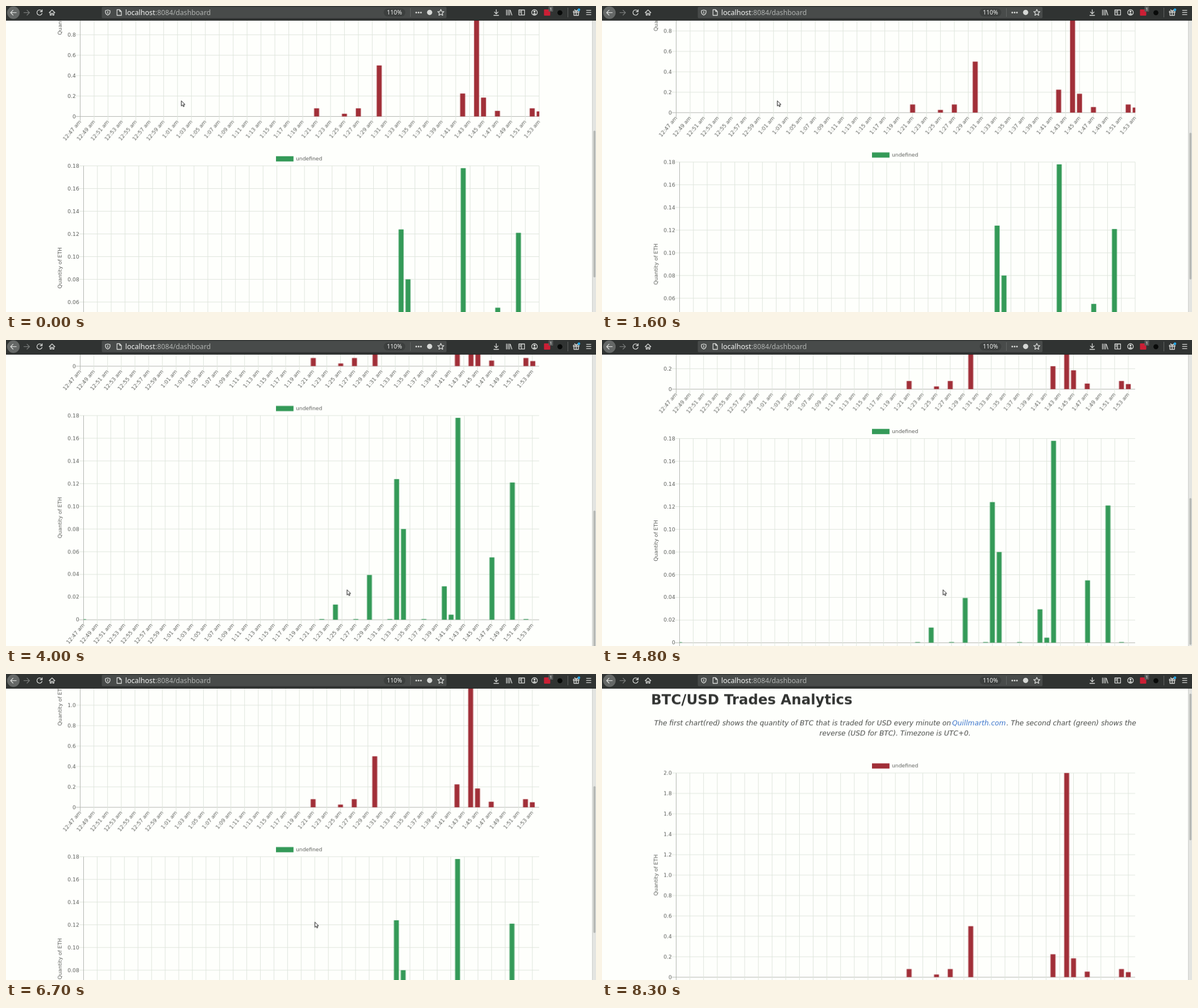
An HTML page for the animation above (8.7 s loop, 1038 by 539 pixels).

```html
<!DOCTYPE html>
<html lang="en">
<head>
<meta charset="utf-8">
<title>Dashboard</title>
<style>
  html, body { margin: 0; width: 100%; height: 100%; overflow: hidden; background: #fefffc; }
  #stage { display: block; width: 1038px; height: 539px; }
  text { font-family: "DejaVu Sans", sans-serif; }
  .axis { font-size: 9.2px; fill: #5c5e5b; }
  .heading { font-size: 24.46px; font-weight: bold; fill: #323432; }
  .intro { font-size: 12.23px; font-style: italic; fill: #484a48; }
  .url { font-family: "Noto Sans", "Open Sans", sans-serif; }
  .grid { stroke: #dfe5dd; fill: none; }
  .base { stroke: #b3b6b1; fill: none; }
  .icon { stroke: #d6d8d6; stroke-width: 1.3; fill: none; stroke-linecap: round; stroke-linejoin: round; }
</style>
</head>
<body>
<svg id="stage" viewBox="0 0 1038 539">
  <g id="page">
    <text class="heading" x="86.2" y="53.5">BTC/USD Trades Analytics</text>
    <text class="intro" x="91.7" y="90.5">The first chart(red) shows the quantity of BTC that is traded for USD every minute on</text>
    <text class="intro" x="616" y="90.5" style="fill:#3973cc">Quillmarth.com</text>
    <text class="intro" x="711.5" y="90.5">. The second chart (green) shows the</text>
    <text class="intro" x="515.5" y="108.8" text-anchor="middle">reverse (USD for BTC). Timezone is UTC+0.</text>
  </g>

  <rect x="1031.5" y="25" width="7" height="514" fill="#e3e4e1"/>
  <path d="M1031.5 25V539" stroke="#cfd0cd"/>
  <rect id="thumb" x="1033.5" y="34.5" width="3.6" height="258.5" rx="1.8" fill="#b5b7b4"/>

  <g id="toolbar">
    <rect width="1038" height="25.5" fill="#303332"/>
    <path d="M0 25H1038" stroke="#1f2221"/>
    <circle cx="13" cy="11.7" r="11" fill="#656867"/>
    <path class="icon" d="M18 11.7H8.3M12.4 7.4L8.1 11.7L12.4 16"/>
    <path class="icon" style="stroke:#777a79" d="M31.5 11.7H41M37 7.4L41.3 11.7L37 16"/>
    <path class="icon" d="M62.6 8.6A4.6 4.6 0 1 0 63.4 13M63.6 6.6V10H60.2"/>
    <path class="icon" d="M76 11.8L81 7L86 11.8M77.7 11V16H79.8V12.8H82.2V16H84.3V11"/>

    <rect x="168.5" y="1.5" width="606.5" height="20" rx="2" fill="#484b4a"/>
    <path class="icon" d="M179 7L183 8.2V11.3Q182.6 14.4 179 16Q175.4 14.4 175 11.3V8.2ZM179 9.4V13.2"/>
    <path class="icon" d="M195.3 6.5H200L203 9.6V16.5H195.3ZM200 6.5V9.6H203"/>
    <text class="url" x="209.7" y="16" font-size="12.5" fill="#f4f5f4">localhost</text>
    <text class="url" x="262.8" y="16" font-size="12.2" fill="#b0b3b1">:8084/dashboard</text>
    <rect x="664.5" y="4.5" width="38" height="14" rx="7" fill="#3c3f3e"/>
    <text class="url" x="670" y="15.3" font-size="10.5" fill="#f0f1f0">110%</text>
    <path d="M711.5 4V19M988.5 3V20" stroke="#606362"/>
    <path class="icon" style="stroke-width:3" stroke-dasharray="0 4.1" d="M721.8 11.5H730.2"/>
    <circle cx="745.3" cy="11.3" r="4.6" fill="#d6d8d6"/>
    <path class="icon" d="M765 6L766.6 9.6L770.4 10L767.6 12.6L768.4 16.4L765 14.5L761.6 16.4L762.4 12.6L759.6 10L763.4 9.6Z"/>

    <path class="icon" d="M862.5 6.5V13.5M859.3 10.6L862.5 13.8L865.7 10.6M858.3 16.5H866.7"/>
    <path class="icon" d="M880.5 7V16M883.3 7V16M886 7V16M887.3 7.6L890 16"/>
    <path class="icon" d="M902.3 7H912.3V15.8H902.3ZM907 7V15.8M904 9.5H905.4M904 11.8H905.4"/>
    <circle class="icon" cx="929.8" cy="11.4" r="4.9"/>
    <path d="M926.8 14.4Q929.8 10.8 932.8 14.4Q929.8 16.6 926.8 14.4M928 9.9a1.8 1.8 0 1 1 3.6 0a1.8 1.8 0 1 1 -3.6 0" fill="#d6d8d6"/>
    <rect x="946.5" y="6" width="11" height="11" rx="1" fill="#cb1f35"/>
    <rect x="954.5" y="0.5" width="8" height="9.5" rx="1" fill="#565958"/>
    <text class="url" x="956.5" y="8.3" font-size="7.5" fill="#fff">1</text>
    <circle cx="974.5" cy="11.8" r="4.4" fill="#080a09"/>
    <path class="icon" d="M998.3 9.2H1008V11.5H998.3ZM999.2 11.8V16.5H1007.2V11.8M1003.2 9.2V16.5M1003 9L1000.4 6.4M1003.4 9L1005.4 7"/>
    <circle cx="1008" cy="6.6" r="2.3" fill="#24a8e8"/>
    <path class="icon" d="M1021.3 7.6H1029M1021.3 11.4H1029M1021.3 15.2H1029"/>
  </g>

  <g id="cursor">
    <path transform="scale(.88)" d="M0.5 0.5V11L3 8.8L4.6 12.4L6.3 11.6L4.7 8.1H8Z" fill="#fff" stroke="#151515" stroke-width="1.1" stroke-linejoin="round"/>
  </g>
</svg>

<script>
const LOOP = 8700, TICK = 100, UPDATE = 3600;
const RIGHT = 938, TICK_LENGTH = 7.7, MINUTES = 66;
const page = document.getElementById('page');

function add(parent, name, attrs, text) {
  const el = document.createElementNS('http://www.w3.org/2000/svg', name);
  for (const key in attrs) el.setAttribute(key, attrs[key]);
  if (text !== undefined) el.textContent = text;
  parent.appendChild(el);
  return el;
}

const easeOut = (p, power) => 1 - (1 - Math.min(1, Math.max(0, p))) ** power;

// Sample a state every tick and hold it until the next one.
function play(el, stateAt) {
  const frames = [];
  for (let t = 0; t < LOOP; t += TICK)
    frames.push({ offset: t / LOOP, easing: 'step-end', ...stateAt(t) });
  frames.push({ ...frames[frames.length - 1], offset: 1 });
  el.animate(frames, { duration: LOOP, iterations: Infinity });
}

// Each move eases from wherever the last one ended to its own target.
function follow(origin, moves, t) {
  return moves.reduce((at, { from, to, target }) => {
    const p = easeOut((t - from) / (to - from), 2);
    return at.map((v, i) => v + (target[i] - v) * p);
  }, origin);
}
const move = (from, to, ...target) => ({ from, to, target });

function clock(minute) {
  const m = 47 + minute;
  return `${m < 60 ? 12 : 1}:${String(m % 60).padStart(2, '0')} am`;
}

function drawTimeAxis({ left, top, bottom }, span) {
  const group = add(page, 'g', {});
  for (let m = 0; m <= MINUTES; m += 2) {
    const x = left + m * (RIGHT - left) / span;
    add(group, 'path', { class: m ? 'grid' : 'base', d: `M${x} ${top}V${bottom + TICK_LENGTH}` });
    add(group, 'text', {
      class: 'axis', 'text-anchor': 'end', y: 3.3,
      transform: `translate(${x} ${bottom + TICK_LENGTH}) rotate(-50)`
    }, clock(m));
  }
  return group;
}

function drawChart(chart) {
  const { left, top, max, step, digits, color, bars } = chart;
  const height = 359.7, bottom = chart.bottom = top + height;
  const width = RIGHT - left, slot = width / MINUTES;

  add(page, 'rect', { x: 475, y: top - 17, width: 30.8, height: 9.2, fill: color });
  add(page, 'text', { class: 'axis', x: 510, y: top - 9.5 }, 'undefined');
  add(page, 'text', {
    class: 'axis', 'text-anchor': 'middle', transform: `translate(98.3 ${top + height / 2}) rotate(-90)`
  }, 'Quantity of ETH');

  const rows = Math.round(max / step);
  for (let i = rows; i >= 0; i--) {
    const y = bottom - height * i / rows;
    add(page, 'path', { class: i ? 'grid' : 'base', d: `M${left - TICK_LENGTH} ${y}H${RIGHT}` });
    add(page, 'text', { class: 'axis', 'text-anchor': 'end', x: left - TICK_LENGTH, y: y + 3.1 },
      i ? (i * step).toFixed(digits) : '0');
  }

  const before = drawTimeAxis(chart, MINUTES), after = drawTimeAxis(chart, MINUTES + 1);
  play(before, t => ({ opacity: t < UPDATE ? 1 : 0 }));
  play(after, t => ({ opacity: t < UPDATE ? 0 : 1 }));

  const area = add(page, 'svg', { x: left, y: top, width, height, overflow: 'hidden' });
  const group = add(area, 'g', {});
  for (const minute in bars) {
    const h = height * bars[minute] / max;
    add(group, 'rect', { x: (minute - 0.36) * slot, y: height - h, width: slot * 0.72, height: h, fill: color });
  }
  // One more minute joins the axis, so all bars squeeze left.
  play(group, t => ({
    transform: `scaleX(${1 - easeOut((t - UPDATE + TICK) / 1000, 4) / (MINUTES + 1)})`
  }));
}

// Bars are keyed by minutes after 12:47.
drawChart({
  left: 130.5, top: 174.4, max: 2, step: 0.2, digits: 1, color: '#a12f38',
  bars: { 34: .08, 38: .027, 40: .08, 43: .5, 55: .225, 57: 2, 58: .185, 60: .055, 65: .08, 66: .05 }
});

// Faint trades appear every five minutes, hidden where a real bar stands.
const greenBars = { 0: .0005 };
for (let m = 35; m <= 65; m += 5) greenBars[m] = .0006;
Object.assign(greenBars, {
  37: .0134, 42: .0395, 46: .124, 47: .08, 53: .0295, 54: .0045, 55: .178, 60: .055, 63: .121
});
drawChart({
  left: 136.5, top: 621.1, max: .18, step: .02, digits: 2, color: '#349a58', bars: greenBars
});

const scrolls = [
  move(300, 1000, 300), move(1200, 1800, 352), move(2000, 2300, 415), move(2700, 3100, 488),
  move(4400, 5200, 434), move(5400, 6100, 264), move(6300, 6400, 285), move(6600, 6800, 304),
  move(6900, 7800, 0)
];
const pointerMoves = [
  move(3200, 3400, 472, 381), move(3500, 3800, 599.5, 439.5), move(6300, 6400, 543, 436.5),
  move(6900, 7800, 95, 164), move(7800, 8300, -20, -30)
];
const scrollAt = t => follow([339.5], scrolls, t)[0];

play(page, t => ({ transform: `translateY(${-scrollAt(t)}px)` }));
play(document.getElementById('thumb'), t => ({ transform: `translateY(${scrollAt(t) * 0.545}px)` }));
play(document.getElementById('cursor'), t => {
  const [x, y] = follow([308, 166.5], pointerMoves, t);
  return { transform: `translate(${x}px, ${y}px)` };
});
</script>
</body>
</html>
```
